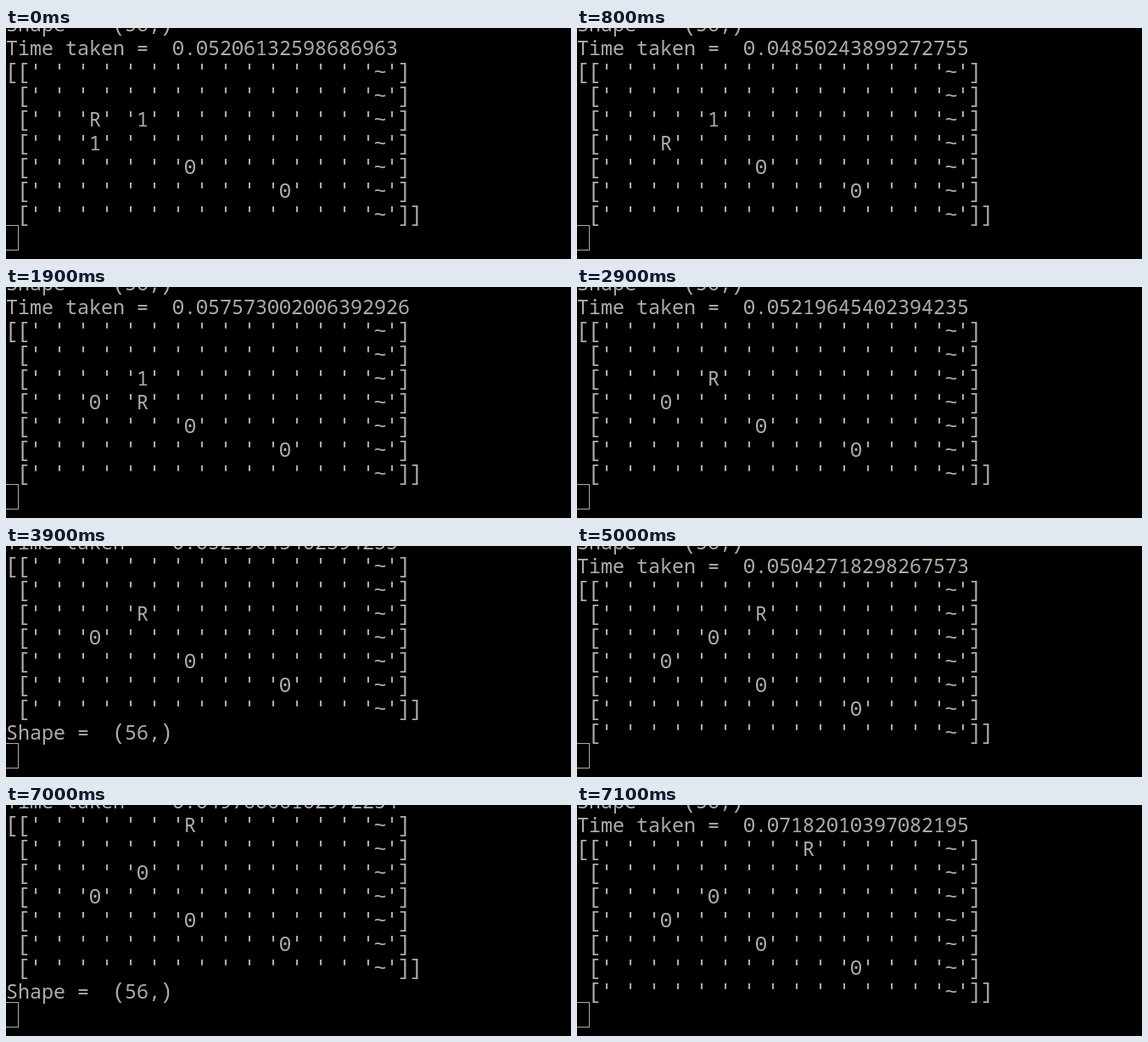
These frames come from a looping animation (666 px wide and 272 px high, 8000 ms). An HTML page with a canvas:

```html
<!DOCTYPE html>
<html lang="en">
<head>
<meta charset="utf-8">
<title>Grid world in a terminal</title>
<style>
  html, body { margin: 0; width: 100%; height: 100%; overflow: hidden; background: #000; }
  canvas { display: block; }
</style>
</head>
<body>
<canvas id="stage" width="666" height="272"></canvas>
<script>
const ctx = document.getElementById('stage').getContext('2d');
const CELL = 14, LINE = 28, BASE = 4, LOOP = 8000;
const ROWS = 7, COLS = 8;
const INK = '#aeaca8';
const TEXT_FONT = '23.3px "Noto Sans Mono", monospace';
const SIGN_FONT = '25px "Liberation Mono", monospace'; // dotted zero, tall brackets
const QUOTE_FONT = '25px "DejaVu Sans Mono", monospace';

// from: first output of the step; shape: when the next shape line scrolls in
const steps = [
  { from: 0,    shape: 700,  robot: [2, 1], time: '0.05206132598686963' },
  { from: 800,  shape: 1800, robot: [3, 1], time: '0.04850243899272755' },
  { from: 1900, shape: 2800, robot: [3, 2], time: '0.057573002006392926' },
  { from: 2900, shape: 3900, robot: [2, 2], time: '0.05219645402394235' },
  { from: 4000, robot: [1, 2], time: '0.05138420701539144' },
  { from: 5000, robot: [1, 3], time: '0.05042718298267573' },
  { from: 6000, shape: 7000, robot: [0, 3], time: '0.04976066102972254' },
  { from: 7100, robot: [0, 4], time: '0.07182010397082195' }
];

// Targets turn from 1 to 0 once the robot has moved off them.
function targetMark(row, col, index) {
  if (row === 4 && col === 3 || row === 5 && col === 5) return '0';
  if (row === 3 && col === 1) return index > 0 ? '0' : '1';
  if (row === 2 && col === 2) return index > 3 ? '0' : '1';
  return col === COLS - 1 ? '~' : ' ';
}

function gridLines(index) {
  const [robotRow, robotCol] = steps[index].robot;
  return Array.from({ length: ROWS }, (_, row) => {
    const cells = Array.from({ length: COLS }, (_, col) => {
      const here = row === robotRow && col === robotCol;
      return "'" + (here ? 'R' : targetMark(row, col, index)) + "'";
    });
    return (row ? ' [' : '[[') + cells.join(' ') + (row === ROWS - 1 ? ']]' : ']');
  });
}

function screenLines(t) {
  let index = steps.length - 1;
  while (steps[index].from > t) index--;
  const step = steps[index];
  const shape = 'Shape =  (56,)';
  const lines = [shape, 'Time taken =  ' + step.time, ...gridLines(index)];
  if (t >= step.shape) {
    lines.shift();
    lines.push(shape);
  }
  return lines;
}

function fontFor(ch) {
  if (ch === "'") return QUOTE_FONT;
  return '0[]()~'.includes(ch) ? SIGN_FONT : TEXT_FONT;
}

function drawLine(text, y) {
  [...text].forEach((ch, i) => {
    if (ch === ' ') return;
    ctx.font = fontFor(ch);
    ctx.fillText(ch, (i + 0.5) * CELL, y);
  });
}

function draw(t) {
  ctx.fillStyle = '#000';
  ctx.fillRect(0, 0, 666, 272);
  ctx.fillStyle = ctx.strokeStyle = INK;
  ctx.textAlign = 'center';
  ctx.textBaseline = 'alphabetic';
  screenLines(t).forEach((text, i) => drawLine(text, BASE + i * LINE));
  // The cursor's left edge falls just outside the stage.
  ctx.lineWidth = 1;
  ctx.strokeRect(-0.5, 232.5, 15, 29);
}

function tick() {
  draw(performance.now() % LOOP);
  requestAnimationFrame(tick);
}
tick();
</script>
</body>
</html>
```
